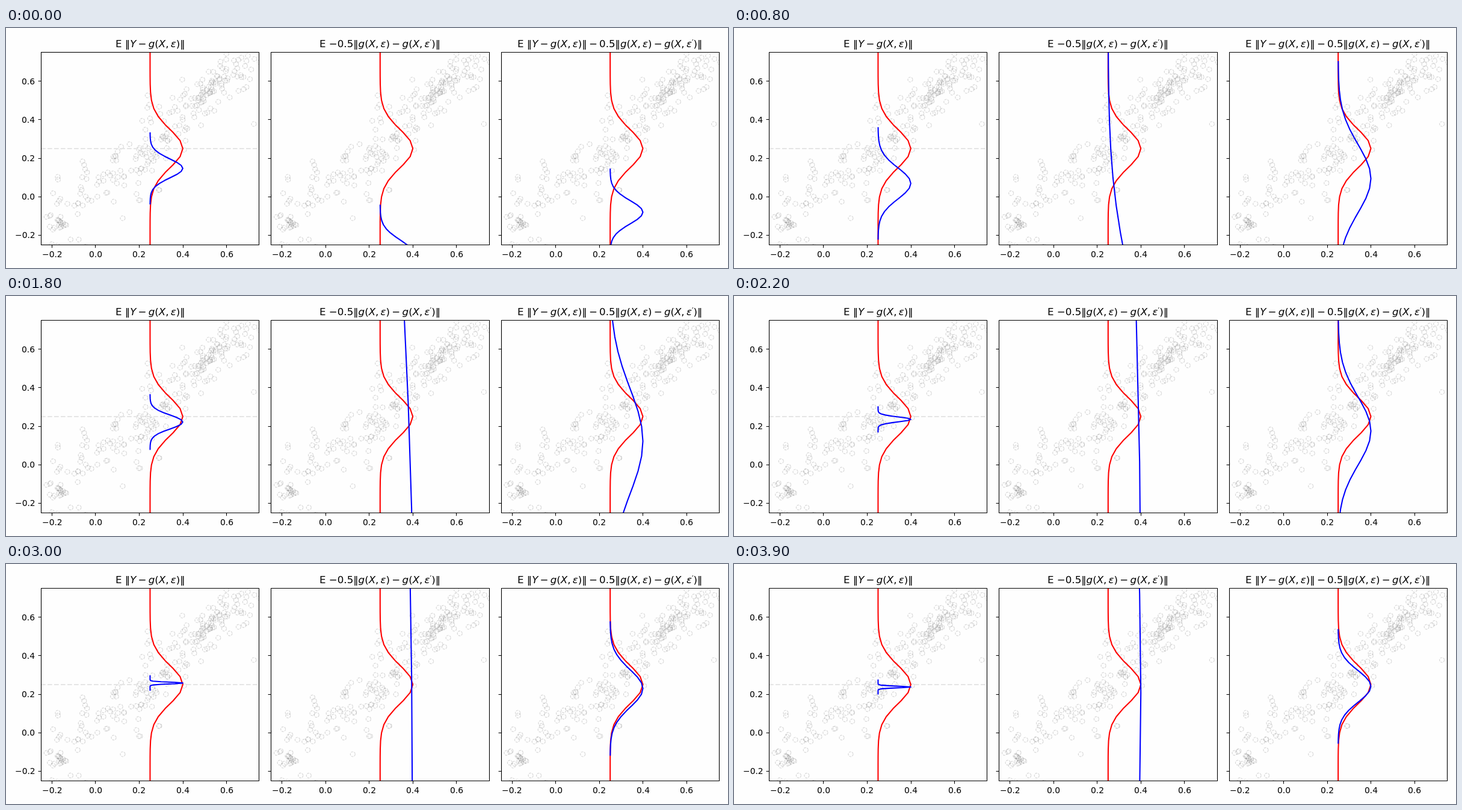
An HTML page with a canvas that plays this animation: 1200x400 px, repeating every 4 s.

```html
<!DOCTYPE html>
<html lang="en">
<head>
<meta charset="utf-8">
<style>
  html, body { margin: 0; width: 100%; height: 100%; overflow: hidden; background: #fefefe; }
  canvas { display: block; width: 1200px; height: 400px; }
</style>
</head>
<body>
<canvas id="stage" width="1200" height="400"></canvas>
<script>
const ctx = document.getElementById('stage').getContext('2d');

const LOOP = 4000, STEP = 100;
const TOP = 40, BOTTOM = 361, WIDTH = 363;
const LEFTS = [58, 440, 823];
const PITCH = 382.35;
const AXIS_X = 239.45;    // x of the density baseline in the first panel
const BUMP = 54.4;        // height of a density peak
const UNIT_X = 362.7, UNIT_Y = 320.8;
const FONT = '"DejaVu Sans", sans-serif';
const toX = v => 148.95 + UNIT_X * v;
const toY = v => 281.2 - UNIT_Y * v;

// Each fit passes through these [step, mean, deviation] poses, in pixels
const PANELS = [
  {
    title: 'E ‖Y~−~g(X,~ε)‖',
    poses: [[0, 234, 15.8], [8, 259, 26], [12, 257, 25.5], [18, 210, 11.7],
            [26, 201.3, 1.5], [34, 195.5, 1.4], [39, 205, 1.4]]
  },
  {
    title: 'E −0.5‖g(X,~ε)~−~g(X,~ε′)‖',
    poses: [[0, 375, 22], [8, 572, 165], [12, 541, 284], [18, 532, 640],
            [26, 505, 1200], [34, 588, 1420], [39, 215, 600]]
  },
  {
    title: 'E ‖Y~−~g(X,~ε)‖~−~0.5‖g(X,~ε)~−~g(X,~ε′)‖',
    poses: [[0, 307, 19.6], [8, 251, 57], [12, 247, 79], [18, 242, 88],
            [26, 208, 36.8], [34, 207, 27], [39, 204, 26.5]]
  }
];

function randomFrom(seed) {
  return () => (seed = (seed * 16807) % 2147483647) / 2147483647;
}

// A loose diagonal band with a few dense spots
function makePoints() {
  const random = randomFrom(2024);
  const jitter = () => (random() + random() + random() - 1.5) * 2;
  const scatter = (count, spread, place) => Array.from({ length: count }, () => {
    const [x, y] = place();
    return [x + spread * jitter(), y + spread * jitter()];
  });
  const along = (from, to) => () => {
    const x = from + (to - from) * random();
    return [x, 336 - 0.82 * (x - 60)];
  };
  return [
    ...scatter(105, 24, along(60, 290)),
    ...scatter(85, 20, along(290, 405)),
    ...scatter(13, 5, () => [91, 326]),
    ...scatter(18, 10, () => [233, 220]),
    ...scatter(8, 4, () => [262, 183]),
    ...scatter(18, 10, () => [341, 98]),
    [412, 160], [254, 270], [255, 270], [221, 287], [223, 287],
    [194, 317], [86, 248], [235, 133], [293, 86], [296, 203]
  ];
}
const points = makePoints();

function strokePath(path, color, width = 2.08) {
  ctx.beginPath();
  path.forEach(([x, y]) => ctx.lineTo(x, y));
  ctx.strokeStyle = color;
  ctx.lineWidth = width;
  ctx.lineJoin = 'round';
  ctx.stroke();
}

function density(mean, dev, reach) {
  const half = 12;
  return Array.from({ length: 2 * half + 1 }, (_, i) => {
    const offset = (i / half - 1) * reach;
    return [AXIS_X + BUMP * Math.exp(-((offset / dev) ** 2) / 2), mean + offset];
  });
}

function fitAt(poses, step) {
  const next = Math.max(1, poses.findIndex(([at]) => at >= step));
  const [start, mean0, dev0] = poses[next - 1];
  const [end, mean1, dev1] = poses[next];
  const u = (step - start) / (end - start);
  const dev = dev0 * (dev1 / dev0) ** u;
  return density(mean0 + (mean1 - mean0) * u, dev, 3.3 * dev + 8);
}

const truth = density(toY(0.25), UNIT_Y / 10, UNIT_Y / 2);

function drawPoints() {
  ctx.strokeStyle = 'rgba(128,128,128,0.3)';
  ctx.lineWidth = 1.2;
  ctx.setLineDash([3.7, 1.4]);
  for (const [x, y] of points) {
    ctx.beginPath();
    ctx.arc(x, y, 4, 0, Math.PI * 2);
    ctx.stroke();
  }
  ctx.setLineDash([]);
}

// '~' stands for the thin space around operators
function drawTitle(text, center) {
  const glyphs = [...text].map(char => {
    const prime = char === '′';
    const style = /[YgXε]/.test(char) ? 'italic ' : '';
    const font = `${style}${prime ? 11.67 : 16.67}px ${FONT}`;
    ctx.font = font;
    const width = char === '~' ? 3.25 : ctx.measureText(char).width;
    return { char, font, width, rise: prime ? 4 : 0 };
  });
  let x = Math.round(center - glyphs.reduce((sum, g) => sum + g.width, 0) / 2);
  ctx.textAlign = 'left';
  for (const { char, font, width, rise } of glyphs) {
    ctx.font = font;
    if (char !== '~') ctx.fillText(char, x, 32 - rise);
    x += width;
  }
}

function drawLabel(text, x, y, align) {
  ctx.font = `13.89px ${FONT}`;
  ctx.textAlign = 'left';
  ctx.fillText(text, Math.round(x - ctx.measureText(text).width * align), Math.round(y));
}

function drawAxes(panel) {
  const left = LEFTS[panel] + 0.5;
  const right = Math.floor(toX(0.75) + panel * PITCH) + 0.5;
  const bottom = BOTTOM + 0.5;
  ctx.strokeStyle = ctx.fillStyle = '#000';
  ctx.lineWidth = 1.1;
  ctx.strokeRect(left, TOP + 0.5, right - left, BOTTOM - TOP);
  for (const value of [-0.2, 0, 0.2, 0.4, 0.6]) {
    const label = value.toFixed(1).replace('-', '−');
    const x = toX(value) + panel * PITCH;
    const y = toY(value);
    const tickX = Math.floor(x) + 0.5, tickY = Math.floor(y) + 0.5;
    strokePath([[tickX, bottom], [tickX, bottom + 4.9]], '#000', 1.1);
    strokePath([[left, tickY], [left - 4.9, tickY]], '#000', 1.1);
    drawLabel(label, x, 382, 0.5);
    if (panel === 0) drawLabel(label, 48.3, y + 5, 1);
  }
  drawTitle(PANELS[panel].title, AXIS_X + panel * PITCH);
}

function draw(step) {
  ctx.fillStyle = '#fefefe';
  ctx.fillRect(0, 0, 1200, 400);
  PANELS.forEach(({ poses }, panel) => {
    ctx.save();
    ctx.beginPath();
    ctx.rect(LEFTS[panel], TOP, WIDTH, BOTTOM - TOP);
    ctx.clip();
    ctx.translate(panel * PITCH, 0);
    drawPoints();
    if (panel === 0) {
      ctx.setLineDash([7.7, 3.3]);
      strokePath([[58, toY(0.25)], [421, toY(0.25)]], '#e5e5e5');
      ctx.setLineDash([]);
    }
    strokePath(truth, '#f00');
    strokePath(fitAt(poses, step), '#00f');
    ctx.restore();
    drawAxes(panel);
  });
}

let shown = -1;
function tick() {
  const step = Math.floor((performance.now() % LOOP) / STEP);
  if (step !== shown) draw(shown = step);
  requestAnimationFrame(tick);
}
tick();
</script>
</body>
</html>
```
